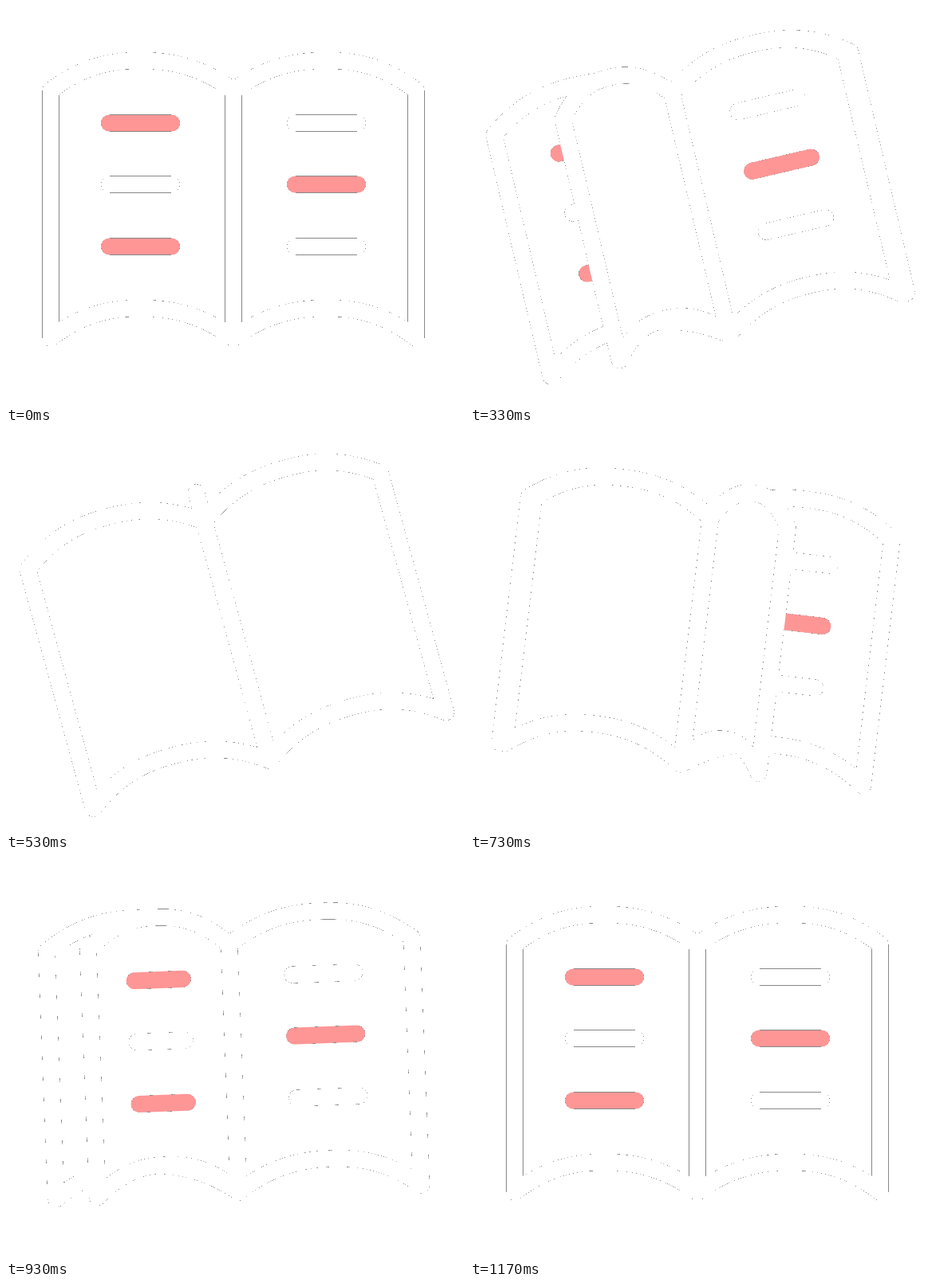
An HTML page that plays this animation: 574x501 px, repeating every 1500 ms.

```html
<!DOCTYPE html>
<html lang="en">
<head>
<meta charset="utf-8">
<title>Book turning its pages</title>
<style>
  html, body { margin: 0; width: 100%; height: 100%; overflow: hidden; background: #fff; }
  svg { display: block; width: 574px; height: 501px; }
</style>
</head>
<body>
<svg viewBox="0 0 574 501" fill="none" stroke-linecap="round" stroke-linejoin="round">
  <!-- keeps only the half-covered pixels along a rim, as gray -->
  <filter id="rim" filterUnits="userSpaceOnUse" x="0" y="0" width="574" height="501"
          color-interpolation-filters="sRGB">
    <feColorMatrix values="0 0 0 0 .53  0 0 0 0 .53  0 0 0 0 .53  1 0 0 0 0"/>
    <feComponentTransfer>
      <feFuncA type="discrete" tableValues="0 0 0 0 0 1 .6 0 0 0"/>
    </feComponentTransfer>
  </filter>
  <g id="color"></g>
  <g filter="url(#rim)">
    <rect width="574" height="501" fill="#000"/>
    <g id="cover"></g>
  </g>
</svg>
<script>
const LOOP = 1500, LAST = 35, TURN = 14;
const PAGE_W = 229, CREST = 117, DROP = 37.5, TOP = 68.5, BOTTOM = 379.5;
const LINE = 21.1;

// Tilt of the whole book: [step, degrees]
const TILT = [[0, 0], [5, -5], [10, -13.2], [14, -18.4], [16, -15.3],
              [22, 6.75], [28, -2.2], [32, 2.4], [35, 0]];

// Bars on a page side, top to bottom; 1 = pink
const LEFT = [1, 0, 1], RIGHT = [0, 1, 0], BLANK = [];
const BAR_Y = [147, 224, 302];

const LEAVES = [
  { start: 0, front: RIGHT, back: BLANK },
  { start: 9, front: RIGHT, back: BLANK },
  { start: 17, front: BLANK, back: LEFT }
];

// How each pass paints a sheet, its lines and its pink bars
const PASSES = [
  { id: 'color', paper: '#fff', ink: '#fff', pink: '#ff9696' },
  { id: 'cover', paper: '#000', ink: '#fff', pink: '#fff' }
];

const clamp = x => Math.min(1, Math.max(0, x));

// Monotone cubic through the keys, flat at each extreme
function tilt(n) {
  const grade = i => (TILT[i + 1][1] - TILT[i][1]) / (TILT[i + 1][0] - TILT[i][0]);
  const slope = i => {
    if (i === 0 || i === TILT.length - 1) return 0;
    const a = grade(i - 1), b = grade(i);
    return a * b > 0 ? 2 * a * b / (a + b) : 0;
  };
  let i = 0;
  while (i < TILT.length - 2 && n > TILT[i + 1][0]) i++;
  const [x0, y0] = TILT[i], [x1, y1] = TILT[i + 1];
  const h = x1 - x0, t = (n - x0) / h, u = 1 - t;
  return y0 * (1 + 2 * t) * u * u + slope(i) * h * t * u * u
       + y1 * t * t * (3 - 2 * t) - slope(i + 1) * h * t * t * u;
}

// Signed width of a leaf: 1 lies right, -1 lies left
function spread(n, start) {
  const p = clamp((n - start) / TURN);
  return (Math.cos(Math.PI * p) + 1 - 2 * p * p * (3 - 2 * p)) / 2;
}

function arc(s, y) {
  const pts = [];
  for (let i = 0; i <= 40; i++) {
    const x = PAGE_W * i / 40;
    const u = Math.abs(x - CREST) / (x < CREST ? CREST : PAGE_W - CREST);
    pts.push((x * s).toFixed(2) + ' ' + (y + DROP * u ** 2.3).toFixed(2));
  }
  return pts;
}

// Three sides of a sheet, open along the spine
const sheet = s => 'M' + arc(s, TOP).concat(arc(s, BOTTOM).reverse()).join('L');

const line = (d, stroke, fill = 'none') =>
  `<path d="${d}" stroke-width="${LINE}" stroke="${stroke}" fill="${fill}"/>`;

function layer({ s, bars }, { paper, ink, pink }) {
  const d = sheet(s);
  const marks = bars.map((hot, i) =>
    line(`M${77.5 * s} ${BAR_Y[i]}H${155.5 * s}`, hot ? pink : ink));
  return line(d, 'none', paper) + marks.join('') + line(d, ink);
}

function draw(n) {
  const leaves = LEAVES.map(l => {
    const s = spread(n, l.start);
    return { s, bars: s > 0 ? l.front : l.back };
  });
  const stack = [
    { s: -1, bars: LEFT },
    { s: 1, bars: RIGHT },
    ...leaves.filter(l => l.s < 0),
    ...leaves.filter(l => l.s >= 0).reverse()
  ];
  // of the sheets lying flat on one side, only the top one shows
  const seen = stack.filter((l, i) =>
    Math.abs(l.s) < 1 || !stack.slice(i + 1).some(m => m.s === l.s));
  const spine = `M0 ${TOP + DROP}V${BOTTOM + DROP}`;
  const place = `rotate(${tilt(n).toFixed(3)} 285 245) translate(285 0)`;
  for (const pass of PASSES) {
    const group = document.getElementById(pass.id);
    group.setAttribute('transform', place);
    group.innerHTML = seen.map(l => layer(l, pass)).join('') + line(spine, pass.ink);
  }
}

let shown = -1;
function tick() {
  // thirty steps a second, then a rest
  const t = performance.now() % LOOP;
  const n = Math.min(LAST, Math.floor(t * 0.03 + 0.12));
  if (n !== shown) draw(shown = n);
  requestAnimationFrame(tick);
}
tick();
</script>
</body>
</html>
```
